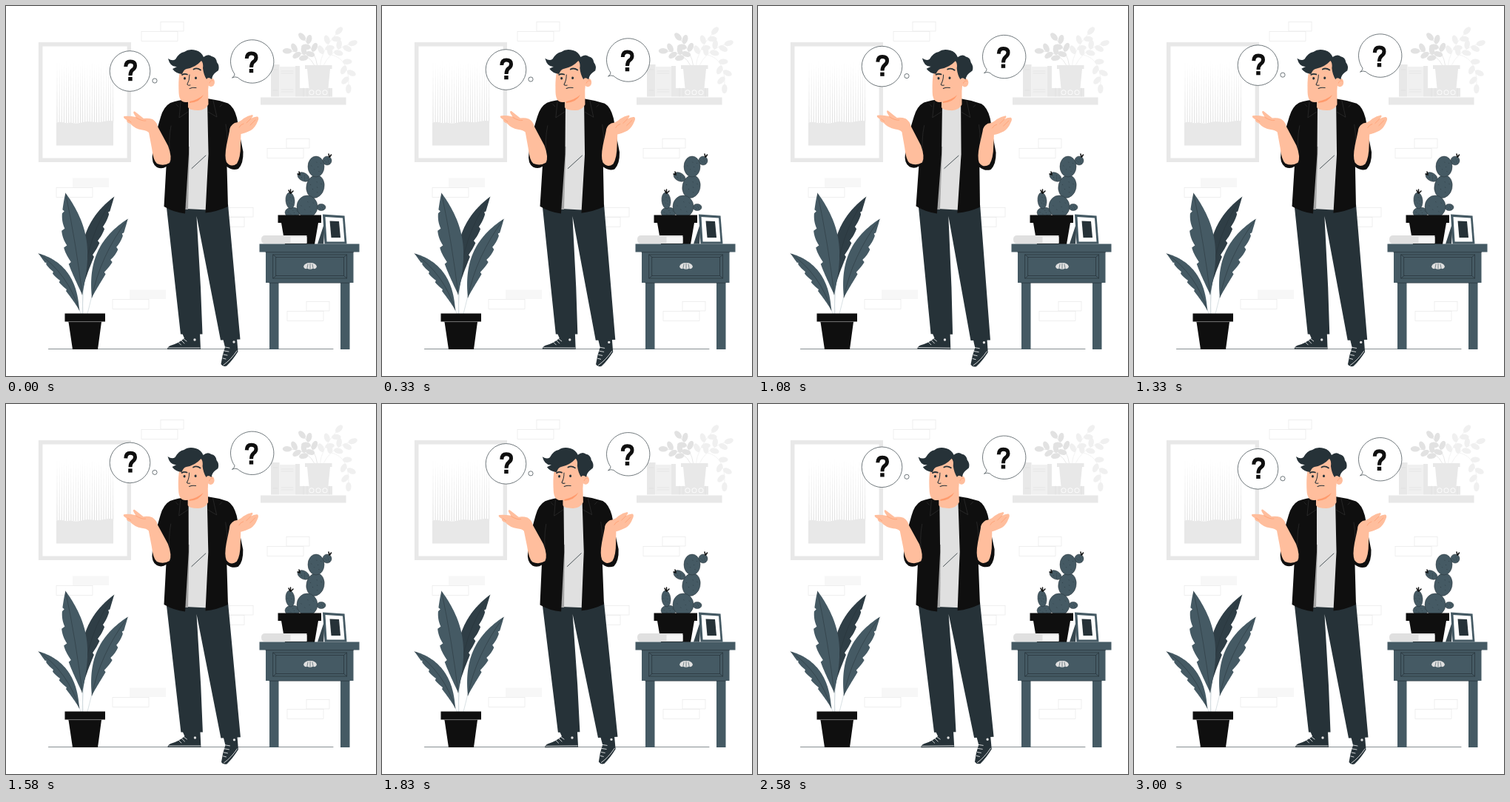
Write an HTML page that moves like this. It is 500x500 px and loops after 3040 ms.

```html
<!DOCTYPE html>
<html lang="en">
<head>
<meta charset="utf-8">
<title>Puzzled man</title>
<style>
html, body { margin: 0; width: 100%; height: 100%; overflow: hidden; background: #fff; }
svg { display: block; width: 100vw; height: 100vh; }
.line { fill: none; stroke-linecap: round; stroke-linejoin: round; }
</style>
</head>
<body>
<svg viewBox="0 0 500 500">
  <!-- wall picture -->
  <path fill="none" stroke="#e8e8e8" stroke-width="5.500" d="M46.700 51.700H166.300V208.300H46.700Z"/>
  <g id="rain" fill="#e2e2e2"></g>
  <path fill="#e8e8e8" d="M68 158q5-2 10-.5t9 0q8 2 15 0t14-1 10 .5 9-1.5 10 0V188.500H68Z"/>

  <g id="bricks"></g>

  <!-- shelf -->
  <g id="sprigs"></g>
  <path fill="#e8e8e8" d="M404 80h36.500v5H404ZM407 85h31l-2.500 26h-26ZM358 79h11.500v43.500H358ZM391 81h6v41.500h-6ZM397 111h44v11.500h-44ZM344 123.500H459.500V133.500H344Z"/>
  <path fill="#f0f0f0" d="M369.500 82H391v40.500h-21.500Z"/>
  <path class="line" stroke="#dcdcdc" stroke-width=".6" d="M372 88h16m-16 3h16m-16 22h16m-16 3h16M361 86h6m-6 28h6M402 111v11m5-11v11m30-11v11"/>
  <path class="line" stroke="#fafafa" stroke-width="7" stroke-dasharray="0 9" d="M413 116.800h19"/>
  <path class="line" stroke="#e8e8e8" stroke-width="5" stroke-dasharray="0 9" d="M413 116.800h19"/>

  <path class="line" stroke="#263238" stroke-width=".55" d="M57.500 463.500H442"/>

  <!-- potted plant -->
  <path class="line" stroke="#cfd8dc" stroke-width=".8" d="M103 386L104 416M105 374L103 416M116 392L110 416M98 406L101 416"/>
  <g id="plant"></g>
  <path fill="#0f0f0f" d="M79.500 415.500H134V426.500H79.500ZM84.500 427H129L124 464H90Z"/>
  <path class="line" stroke="#444" stroke-width=".6" d="M84 426.800H129"/>

  <!-- cactus -->
  <g id="cactus"></g>
  <path class="line" stroke="#0f0f0f" stroke-width="1.500" d="M437 204l-1-4m1.500 4l2-3M397 228l-3-1m3 0l-1-3M384 253l-2-4m2.500 4v-5m.5 5l3-3"/>
  <path fill="#0f0f0f" d="M367.500 282.500H426V293H367.500ZM372 293H422L417 322H377Z"/>

  <!-- side table -->
  <path fill="#e0e0e0" d="M406.500 310H350Q345 310 345 315.500T350 321H406.500Z"/>
  <path fill="#f5f5f5" d="M384.500 312H406.500V320H384.500Z"/>
  <path fill="#455a64" d="M356 373H368.500V464H356ZM452 373H464.500V464H452ZM351 332H469.500V374H351ZM342.500 321.500H477.500V332.500H342.500Z"/>
  <path class="line" stroke="#263238" stroke-width=".7" d="M351 332.700H469.500M361 336H460.500V368H361ZM365 339.500H456.500V364.500H365ZM361 336l4 3.500M460.500 336l-4 3.500M361 368l4-3.500M460.500 368l-4-3.500M356 374.200H464"/>
  <path fill="#e0e0e0" d="M402 352.500Q403 347 411 347T420 352.500Q418 356.500 415 354.500Q411 357 407 354.500Q404 356.500 402 352.500Z"/>
  <path class="line" stroke="#455a64" stroke-width=".7" d="M407 354l1-5m3 6v-7m4 6l-1-5"/>

  <!-- photo frame -->
  <path fill="#37474f" d="M431 291L421 321.500H429Z"/>
  <path fill="#455a64" d="M428 281.500L457.500 283.500L460.500 321.500H430.500Z"/>
  <path fill="#fff" d="M431.500 285L455 286.500L457.500 318.500H433.500Z"/>
  <path fill="#263238" d="M437.500 290.500L450 291L452 313H439.500Z"/>

  <!-- man -->
  <g id="man">
    <g fill="#263238">
      <path d="M238 442L241 449Q233 456 222 459Q218 461 218 464H263L262 442Z"/>
      <path d="M293 449L296 461Q292 472 290.500 484Q293 488 298 486.500Q306 479 313.500 467L312 449Z"/>
      <path d="M216.500 268L236 443.500H265.500L263 380L257.500 284L290 451.500L316.500 450.500L300 268Z"/>
    </g>
    <path class="line" stroke="#fff" stroke-width=".8" d="M219.500 462H262M237 452l4 4m-8-1.500l3.500 3.500M240 450l4 3M296 461l6 1m-7 4l6 1m-7 4l5 1m-6 4l4 1M294 485Q304 478 312 466"/>
    <path class="line" stroke="#e0e0e0" stroke-width="3.400" d="M255 451h0M308 454h0"/>

    <path fill="#e0e0e0" d="M245 134L273 132V275.500L242.500 274Z"/>
    <path fill="#a6a6a6" d="M246 190L248 190L246 275H242Z"/>
    <path class="line" stroke="#263238" stroke-width=".8" d="M251 219.500L270 202"/>

    <g fill="#0f0f0f">
      <path d="M247 126Q232 127 222 131Q213 136 209 150C204 167 200 181 198 199Q196 213 204 218Q211 221 216.500 217L213.500 271Q227 279 242 280.500L247 200Z"/>
      <path d="M272 125Q287 127 300 131.500Q308 136 312 151Q314 160 315 170L320.500 197Q321 213 314 220Q306 223 298.500 217L300 271Q285 278 269.500 279.500L273.500 200Z"/>
    </g>
    <path class="line" stroke="#3c3c3c" stroke-width=".5" d="M236 130L234 151L246 143M280 128L285 150L273 143M222 211Q219 180 223 162M298 211Q301 185 297 160M230 133l3 3m59-3l-3 3"/>

    <!-- neck and face -->
    <g fill="#ffbe9d">
      <path d="M246 120L273 104L273.500 133Q269 141 260 141Q248 141 246 137Z"/>
      <path d="M237 83C233 92 233 104 233.500 117Q234 130 243 130Q261 130 273 113L276 88L262 70Z"/>
      <ellipse cx="277" cy="103" rx="5" ry="6"/>
    </g>
    <path fill="#ff9a6c" d="M248 129Q259 127 267 120Q262 130 248 131Z"/>
    <path fill="#263238" d="M238 92Q229 91 225 85L231 82Q222 83 219 71Q225 75 229 72Q234 63 241 62Q247 57.500 257 60Q264 62 267 69Q273 64 278 68Q284 69 285 76Q289 81 287 87L283 90Q279 93 278 99Q273 95 271 99Q267 93 266 84Q267 77 264 74Q256 83 244 85Q240 86 238 92Z"/>
    <g class="line" stroke="#263238">
      <path d="M248 93Q248 101 244.800 106Q246 108 249 107M248 111.500Q252 109.500 257 110.500"/>
      <path stroke-width="1.800" d="M238 93Q241 91 245 92.500M253.500 85.500Q258 83 263 86.500"/>
      <path stroke-width="3" d="M241.500 97.500v.5M256.500 97v.5"/>
    </g>

    <!-- forearms and hands -->
    <g fill="#ffbe9d">
      <path d="M205 163Q204 157 198 153Q192 151 186 152Q181 148 174 142.500Q171 142 173 146L175.500 150Q166 148 159.500 149Q157.500 151 163 154Q163 158 168 159Q174 166 184 167.500Q190 168 193 171L197 192Q199 209 204 213Q213 217 221 212Q225 205 219 189Z"/>
      <path d="M302 169Q302 162 309 158Q316 157 321 152Q327 148 333 147Q335 149 331 152Q336 149 340 149.500Q342.500 151 340 156Q337 164 331 168Q323 172 317.500 173L317 188Q317 205 312 213Q304 219 298 211Q295 204 298 188Z"/>
    </g>
    <path class="line" stroke="#ff9a6c" stroke-width=".7" d="M169 157L165 154M176 151Q184 156 189 155M331 152L325 158M337 154L330 161M315 164Q317 160 321 159M275 104Q277 99 280 101"/>
  </g>

  <!-- thought bubbles -->
  <g id="bubbles" fill="#fff" stroke="#263238" stroke-width=".65">
    <circle cx="167.500" cy="88" r="27.300"/>
    <circle cx="201" cy="101" r="3.100"/>
    <path d="M309 92A29.200 29.200 0 1 1 313 96.500Q309 95 305.500 97Q309 95 309 92Z"/>
    <g id="mark" stroke="none">
      <path class="line" style="stroke-linecap:butt" stroke="#0f0f0f" stroke-width="5" d="M161.800 82Q162 75 168 75Q174.500 75 174.500 80.500Q174.500 84 171 86.300Q168 88.600 168 94"/>
      <path fill="#0f0f0f" d="M165.200 96h5.500v5.200h-5.500Z"/>
    </g>
    <use href="#mark" x="163.500" y="-11"/>
  </g>
</svg>
<script>
const $ = id => document.getElementById(id);
const range = n => [...Array(n).keys()];
const fill = (id, items, draw) => $(id).innerHTML = items.map(draw).join('');

// Point and direction on a quadratic curve
function along([x0, y0, cx, cy, x1, y1], s) {
  const q = 1 - s;
  return {
    x: q * q * x0 + 2 * q * s * cx + s * s * x1,
    y: q * q * y0 + 2 * q * s * cy + s * s * y1,
    a: Math.atan2(q * (cy - y0) + s * (y1 - cy), q * (cx - x0) + s * (x1 - cx))
  };
}
const stem = ([x0, y0, ...rest], style) => `<path class="line" d="M${x0} ${y0}Q${rest}" ${style}/>`;

fill('rain', range(25), i => {
  const x = 69 + i * 3.15, top = 73 + 5 * Math.abs(Math.sin(i * 2.3));
  return `<path d="M${x} ${top}L${x + .55} 158H${x - .55}Z"/>`;
});

// Pairs of bricks: lower x and y, shift and width of the upper one, its fill
const outline = 'fill="none" stroke="#e8e8e8" stroke-width=".7"', pale = 'fill="#f7f7f7"';
fill('bricks', [
  [183, 34.5, 26, 31, outline], [353, 192.5, 26, 31, outline], [380, 412.5, 26, 31, outline],
  [68, 245.5, 22, 49, pale], [144, 396.5, 23, 49, pale], [273, 285.5, 12, 49, outline]
], ([x, y, dx, w, style]) =>
  `<rect x="${x}" y="${y}" width="49" height="13" ${outline}/>` +
  `<rect x="${x + dx}" y="${y - 13}" width="${w}" height="12.5" ${style}/>`);

// Sprigs with leaves on alternating sides
fill('sprigs', [
  [[421, 82, 418, 62, 404, 46], '#e2e2e2'], [[418, 82, 408, 62, 386, 61], '#e2e2e2'],
  [[424, 82, 426, 60, 446, 38], '#f0f0f0'], [[428, 82, 438, 60, 463, 52], '#f0f0f0'],
  [[440, 66, 464, 72, 463, 106], '#f0f0f0']
], ([curve, color]) => stem(curve, `stroke="${color}" stroke-width=".8"`) + range(5).map(i => {
  const p = along(curve, .4 + i * .15), turn = i == 4 ? 0 : i % 2 ? .9 : -.9;
  return `<ellipse cx="6" rx="6.300" ry="3.700" fill="${color}" transform="translate(${p.x} ${p.y})rotate(${(p.a + turn) * 180 / Math.PI})"/>`;
}).join(''));

// Big leaves: spine, half width, torn side, colour
fill('plant', [
  [[105, 377, 108, 312, 146, 258], 11, 1, '#2f3e46'], [[103, 390, 95, 322, 80.5, 253], 16, -1, '#455a64'],
  [[116, 394, 127, 338, 164.5, 288], 12, 1, '#455a64'], [[99, 411, 84, 362, 44, 334.5], 8.5, -1, '#455a64']
], ([spine, width, torn, color]) => {
  const edge = side => range(61).map(i => {
    const s = i / 60, p = along(spine, s);
    const tear = side == torn && s > .3 && s < .85 ? .3 * (1 - s * 6 % 1) ** 2 : 0;
    const w = side * width * Math.sin(Math.PI * s ** 1.1) ** .9 * (1 - tear);
    return `${p.x - w * Math.sin(p.a)} ${p.y + w * Math.cos(p.a)}`;
  });
  return `<path fill="${color}" d="M${[...edge(1), ...edge(-1).reverse()].join('L')}Z"/>` +
    stem(spine, 'stroke="#263238" stroke-width=".5"');
});

// Cactus pads: centre, radii, tilt
fill('cactus', [
  [387, 279, 10, 7, 0], [384, 263, 6, 11, -6], [426, 272, 6, 4.5, 0], [402, 231, 8.5, 5.5, 28],
  [434, 209, 6, 6, 0], [418, 244, 12, 15.5, 12], [419, 217, 11, 14, 0], [407, 271, 14, 15, 0]
], ([x, y, rx, ry, tilt]) => `<g stroke="#263238" stroke-width=".5" transform="translate(${x} ${y})rotate(${tilt})">` +
  `<ellipse rx="${rx}" ry="${ry}" fill="#455a64"/>` + range(6).map(i => {
    const d = .7 * Math.sqrt((i + .5) / 6);
    return `<path d="M${rx * d * Math.cos(i * 2.4)} ${ry * d * Math.sin(i * 2.4)}l.7 1"/>`;
  }).join('') + '</g>');

const LOOP = 3040;

// cubic-bezier(.42, 0, .58, 1)
function ease(p) {
  let lo = 0, hi = 1;
  for (let i = 0; i < 20; i++) {
    const s = (lo + hi) / 2, q = 1 - s;
    if (q * s * (1.26 * q + 1.74 * s) + s ** 3 < p) lo = s; else hi = s;
  }
  return lo * lo * (3 - 2 * lo);
}

function sway(u) {
  if (u < .25) return ease(u * 4);
  if (u < .75) return 1 - 2 * ease((u - .25) * 2);
  return ease((u - .75) * 4) - 1;
}

function frame() {
  const u = performance.now() % LOOP / LOOP;
  $('man').setAttribute('transform', `rotate(${sway(u)} 250.500 273)`);
  $('bubbles').setAttribute('transform', `translate(0 ${-9 * (1 - Math.abs(1 - 2 * u))})`);
  requestAnimationFrame(frame);
}
frame();
</script>
</body>
</html>
```
